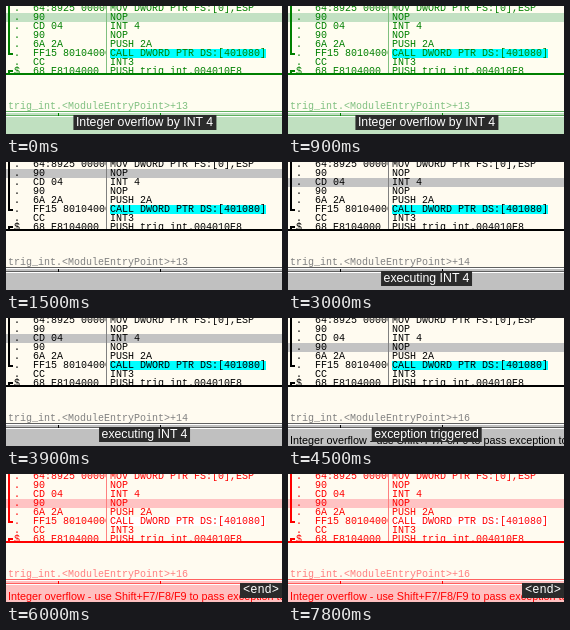
Animation of 276 by 128 pixels, one loop 9000 ms. Source, as an HTML page:

```html
<!DOCTYPE html>
<html lang="en">
<head>
<meta charset="utf-8">
<title>INT 4 overflow trace</title>
<style>
html, body { margin: 0; width: 100%; height: 100%; overflow: hidden; background: #fffbf0; }
#stage { position: relative; width: 276px; height: 128px; overflow: hidden; isolation: isolate; }
svg { position: absolute; left: 0; top: 0; shape-rendering: crispEdges; }
.code { font: 10px "Liberation Mono", "DejaVu Sans Mono", monospace; white-space: pre; }
.info { fill: #808080; }
.status { font: 10.8px "Liberation Sans", Arial, sans-serif; }

.caption {
  position: absolute; left: 138.5px; top: 109px; height: 15px; padding: 0 3px;
  transform: translateX(-50%); background: #2b2b2b; color: #fff;
  font: 12.3px/15px "Liberation Sans", Arial, sans-serif; white-space: nowrap;
}
.end { left: auto; right: 0; transform: none; font: 12px/15px "Liberation Mono", monospace; }
.tint { position: absolute; inset: 0; mix-blend-mode: screen; }
.green { background: #008000; }
.red { background: #ff0000; }

/* One 9 s loop: start, step, interrupt, exception, end */
.start, .trap, .raise, .last, .at13, .at16, .select {
  animation: 9s step-end infinite;
}
.start { animation-name: start; }
.trap { animation-name: trap; }
.raise { animation-name: raise; }
.last { animation-name: last; }
.at13 { animation-name: at13; }
.at16 { animation-name: at16; }
.select { animation-name: select; }

@keyframes start { 0% { visibility: visible } 16.6667%, 100% { visibility: hidden } }
@keyframes trap { 0% { visibility: hidden } 33.3333% { visibility: visible } 50%, 100% { visibility: hidden } }
@keyframes raise { 0% { visibility: hidden } 50% { visibility: visible } 66.6667%, 100% { visibility: hidden } }
@keyframes last { 0% { visibility: hidden } 66.6667%, 100% { visibility: visible } }
@keyframes at13 { 0% { visibility: visible } 33.3333%, 100% { visibility: hidden } }
@keyframes at16 { 0% { visibility: hidden } 50%, 100% { visibility: visible } }
@keyframes select {
  0% { transform: translateY(7px) }
  33.3333% { transform: translateY(16px) }
  50%, 100% { transform: translateY(25px) }
}
</style>
</head>
<body>
<div id="stage">
  <svg width="276" height="128" viewBox="0 0 276 128">
    <defs>
      <clipPath id="list"><rect width="276" height="67"/></clipPath>
      <clipPath id="hex"><rect width="100" height="67"/></clipPath>
    </defs>
    <rect width="276" height="128" fill="#fffbf0"/>
    <rect class="select" width="276" height="9" fill="#c3c3c3"/>
    <rect x="104" y="43" width="156" height="9" fill="#00ffff"/>
    <path d="M100.5 0V67" stroke="#808080"/>
    <g id="rows" class="code"></g>
    <path d="M3 0V48H7M3 67V65H7" fill="none" stroke="#000" stroke-width="2"/>
    <rect y="67" width="276" height="2"/>

    <g class="code info">
      <text class="at13" x="2" y="103">trig_int.&lt;ModuleEntryPoint&gt;+13</text>
      <text class="trap" x="2" y="103">trig_int.&lt;ModuleEntryPoint&gt;+14</text>
      <text class="at16" x="2" y="103">trig_int.&lt;ModuleEntryPoint&gt;+16</text>
    </g>

    <rect y="105" width="276" height="23" fill="#c0c0c0"/>
    <path d="M0 105.5H276M0 109.5H276" stroke="#606060"/>
    <path d="M0 106.5H276M0 110.5H276" stroke="#fff"/>
    <path d="M52.5 107V110M154.5 107V110" stroke="#000"/>
    <text class="status at16" x="2" y="126">Integer overflow - use Shift+F7/F8/F9 to pass exception to program</text>
  </svg>

  <div class="tint green start"></div>
  <div class="tint red last"></div>
  <div class="caption start">Integer overflow by INT 4</div>
  <div class="caption trap">executing INT 4</div>
  <div class="caption raise">exception triggered</div>
  <div class="caption end last">&lt;end&gt;</div>
</div>
<script>
const listing = [
  [".", "64:8925 00000000", "MOV DWORD PTR FS:[0],ESP"],
  [".", "90", "NOP"],
  [".", "CD 04", "INT 4"],
  [".", "90", "NOP"],
  [".", "6A 2A", "PUSH 2A"],
  [".", "FF15 80104000", "CALL DWORD PTR DS:[401080]"],
  [".", "CC", "INT3"],
  ["$", "68 E8104000", "PUSH trig_int.004010E8"]
];
const cell = (x, y, text, clip) =>
  `<g clip-path="url(#${clip})"><text x="${x}" y="${y}">${text}</text></g>`;

document.getElementById("rows").innerHTML = listing.map(([mark, bytes, command], i) => {
  const y = 5 + i * 9;
  return cell(8, y, mark, "list") + cell(27, y, bytes, "hex") + cell(104, y, command, "list");
}).join("");
</script>
</body>
</html>
```
